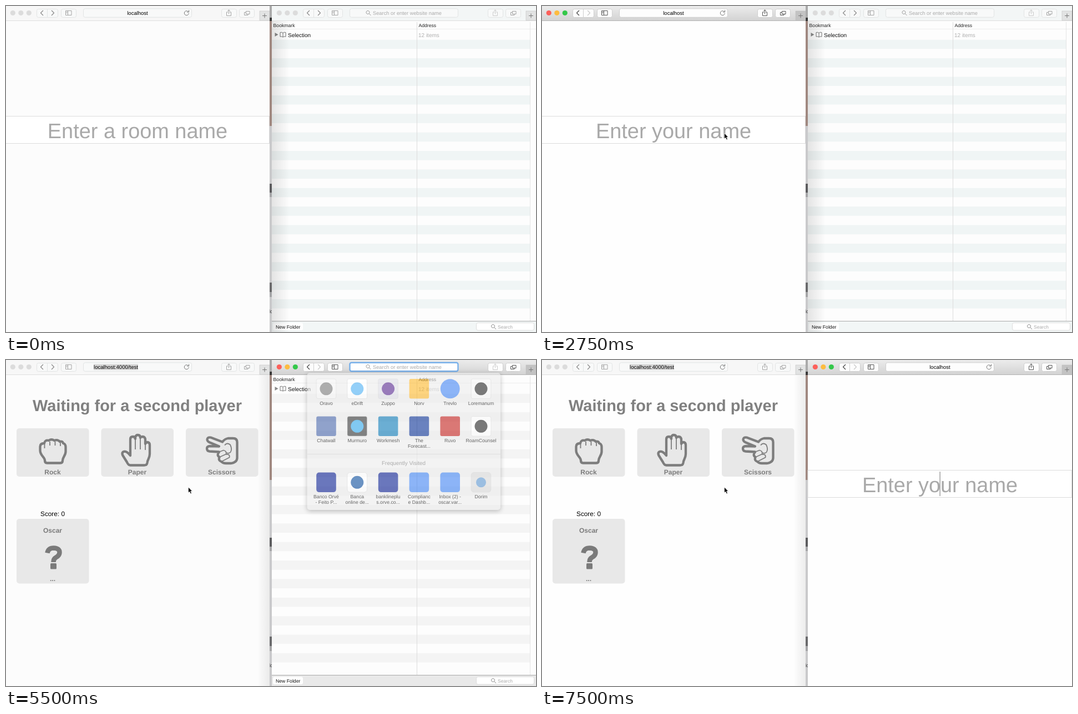
Animation of 955x587 px, one loop 8000 ms. Source, as an HTML page:

```html
<!DOCTYPE html>
<html>
<head>
<meta charset="utf-8">
<style>
html, body { margin: 0; width: 100%; height: 100%; overflow: hidden; background: #fff }
svg { display: block; font-family: "Liberation Sans", Arial, sans-serif; text-rendering: geometricPrecision; white-space: pre }
.pop { filter: drop-shadow(0 2px 4px rgba(0, 0, 0, .4)) }
</style>
</head>
<body>
<svg id="stage" width="955" height="587" viewBox="0 0 955 587">
  <defs>
    <linearGradient id="bar" x2="0" y2="1"><stop stop-color="#ececec"/><stop offset="1" stop-color="#d3d3d3"/></linearGradient>
    <linearGradient id="shadeR"><stop stop-opacity=".1"/><stop offset="1" stop-opacity="0"/></linearGradient>
    <linearGradient id="shadeL"><stop stop-opacity="0"/><stop offset="1" stop-opacity=".07"/></linearGradient>
  </defs>
  <g id="scene"></g>
</svg>
<script>
const STEP = 250, LOOP = 8000;
const scene = document.getElementById('scene');

const rect = (x, y, w, h, fill, more = '') => `<rect x="${x}" y="${y}" width="${w}" height="${h}" fill="${fill}" ${more}/>`;
const circle = (x, y, r, fill) => `<circle cx="${x}" cy="${y}" r="${r}" fill="${fill}"/>`;
const line = (d, stroke, width = 1, more = '') => `<path d="${d}" fill="none" stroke="${stroke}" stroke-width="${width}" stroke-linejoin="round" ${more}/>`;
const text = (x, y, s, size, fill = '#000', more = '') => `<text x="${x}" y="${y}" font-size="${size}" fill="${fill}" ${more}>${s}</text>`;
const mid = 'text-anchor="middle"', bold = mid + ' font-weight="bold"';
const glass = (x, y, c) => line(`M${x + 3} ${y}a3 3 0 1 0 .01 0M${x + 5.2} ${y + 5.2}l3.3 3.3`, c);

// Toolbar of one window. url: {value, at, select, focus}; no value shows the prompt.
function toolbar(active, url, shareOff, idle) {
  const ink = active ? '#555' : '#a4a4a4', edge = active ? '#cfcfcf' : '#e2e4e4';
  const face = active ? '#fdfdfd' : '#f8f9f9';
  const button = (x, w) => rect(x + .5, 5.5, w, 15, face, `rx="3" stroke="${edge}"`);
  const lights = active ? ['#fc605b', '#fdbc40', '#34c84a'] : Array(3).fill('#dcdcdc');
  let s = rect(-1, 0, 476, 26, active ? 'url(#bar)' : idle) + rect(-1, 26, 476, 1, active ? '#b4b4b4' : '#dedede');
  lights.forEach((c, i) => s += circle(12.3 + 14.5 * i, 12.5, 4.6, c));
  s += button(55, 38) + rect(74, 6, 1, 14, edge);
  s += line('M67 8l-4.5 4.5 4.5 4.5', active ? '#444' : '#888', 1.2) + line('M82 8l4.5 4.5-4.5 4.5', active ? '#c8c8c8' : '#888', 1.2);
  s += button(99, 27) + line('M107.5 8.5h10.5v8h-10.5zM111.5 8.5v8M108.5 10.5h2M108.5 12.5h2', ink);
  s += rect(139.5, 4.8, 195, 15.5, url.focus ? '#fff' : face, `rx="3" stroke="${url.focus ? '#78b0ea' : edge}" stroke-width="${url.focus ? 2.4 : 1}"`);
  if (url.select) s += rect(158, 7.5, 80, 10.5, url.select);
  if (!url.value) s += glass(169, 8.5, '#999') + text(181, 16, 'Search or enter website name', 9.3, '#aaa');
  else s += url.at ? text(url.at, 16, url.value, 9.6) : text(237, 16, url.value, 9.5, '#000', mid);
  if (url.value && !url.caret) s += line('M328.6 10.5a4 4 0 1 0 .7 2.6M329.5 7.5v3.5h-3.5', '#777');
  if (url.caret) s += rect(263.5, 7, 1, 11.5, '#000');
  s += button(388, 27) + line('M400 11h-2.500v6.500h8v-6.500h-2.500M401.500 14.500v-7.500M399 9.300l2.500-2.500 2.500 2.500', shareOff ? '#ccc' : ink);
  s += button(420, 27) + line('M432.500 9.500h6.500v5h-6.500zM432 11.500h-2.500v5h6.500v-2', ink);
  return s + rect(457, 9, 18, 17, active ? '#c3c3c3' : '#e2e3e3', 'stroke="#bbb" stroke-width=".5"') + line('M462 17.500h8M466 13.500v8', '#777');
}

function prompt(label, typed, caret) {
  const x = 237 + typed.length * 9.2;
  return rect(-1, 198.5, 475.5, 49, '#fff', 'stroke="#dcdcdc"')
    + text(237, 237.5, typed || label, 37.9, typed ? '#333' : '#a9a9a9', mid)
    + (caret ? rect(x - .5, 201, 1.2, 44, '#888') : '');
}

const hands = [
  ['Rock', 84, 'M74 185.500Q70 185.500 70 181C70 175 61.500 172 61.500 163V156Q61.500 150 69 150Q70 143.500 77 145Q82 141.500 87 145Q93 142.500 97 147Q102 145.500 103 150Q107.500 151 107.500 157V165C107.500 172 102 175 102 181Q102 185.500 98 185.500Z',
    'M69.500 150v9M79 147v7M88.500 147v7M98 149v6'],
  ['Paper', 236.5, 'M224 189.500Q220 189 218 184L210.500 172Q208 167 212 165Q217 163 224 172V143Q224 138 228.500 138Q232 138 233 142V139Q234 135 237.500 135Q242 135 242 140Q243 138 246.500 138Q251 138.500 251 144V151Q252 148 255 148Q259 148.500 259 153V169C259 177 255 179 254.500 185Q254 189.500 249 189.500Z',
    'M233 141v20M242 140v21M251 149v13'],
  ['Scissors', 389, 'M390 147.500L369 139.500Q363 138.500 362.500 143Q362.500 146 366 148L384 155.500L367 155Q362 155.500 362 159.500Q362 164 367 164.500L384 165.500Q379 171 384.500 175Q382 181 388 183Q391 186 396 186H406Q416.500 184 416.500 176V148Q416.500 141 409 141H400Q394 142 390 147.500Z',
    'M384 165.500L392 162.500Q398 164 396.500 169.500L384.500 175M396.500 170Q404 169 402.500 175.500L388 183M394 153.500Q398 148 404 152.500Q408 161 404.500 166Q402 169 397 167']
];

function game(fading) {
  let cards = '';
  hands.forEach(([name, x, outline, inner]) => {
    cards += rect(x - 65, 123, 130.5, 87, '#e8e8e8', 'rx="5"') + line(outline, '#7d7d7d', 4.3)
      + line(inner, '#7d7d7d', 1.8) + text(x, 205.7, name, 12, '#7d7d7d', bold);
  });
  cards += rect(19, 286, 130.5, 116.5, '#e8e8e8', 'rx="5"') + text(84, 310.5, 'Oscar', 12, '#7a7a7a', bold)
    + line('M74.500 347.500Q76 338.500 86 338.500Q97 339 96.500 347Q96 352.500 90 355.500Q85.500 358 85.500 364', '#7a7a7a', 8.5)
    + rect(80, 366, 11, 10.5, '#7a7a7a', 'rx="1.5"') + text(84, 398, '...', 12, '#7a7a7a', bold);
  return (fading ? rect(0, 70, 475, 332, '#fafafa') : '')
    + text(236.5, 91.8, 'Waiting for a second player', 28.95, '#808080', bold)
    + `<g opacity="${fading ? .55 : 1}">${cards}</g>` + text(84, 281, 'Score: 0', 11.8, '#000', mid);
}

const autofill = () => `<g class="pop">${rect(-6, 248.5, 182, 32, '#ececec', 'rx="4"')}</g>`
  + rect(10, 256, 21, 16, '#fafafa', 'rx="1.5" stroke="#bbb" stroke-width=".7"')
  + circle(16.5, 261, 1.9, '#444') + rect(13, 263.5, 7, 3.5, '#444', 'rx="1"') + line('M22.500 261.500h6M22.500 264h6', '#ccc')
  + text(37.5, 262, 'AutoFill your contact info', 10.2, '#666') + text(37.5, 273.8, 'Oscar Milton Varelo', 10.1);

// Each site: label lines, tile colour, optional dot colour.
const sites = [
  ['Oravo', '#f4f4f4', '#777'], ['eDrift', '#fff', '#4db1f6'], ['Zuppo', '#dedee6', '#56258f'],
  ['Norv', '#fdb92d'], ['Trevlo', 'none', '#4285f4'], ['Loremanum', '#f6f6f6', '#222'],
  ['Chatwall', '#4866ab'], ['Murmuro', '#343536', '#2fa8ec'], ['Workmesh', '#0b7ab8'],
  ['The|Forecast...', '#0a3296'], ['Ruvo', '#c4201c'], ['RoamCounsel', '#fff', '#222'],
  ['Banco Orv\u00e9|- Feito P...', '#0a1f92'], ['Banca|online de...', '#fff', '#0b4d9e'], ['banklineplu|s.orve.co...', '#0a1f92'],
  ['Complianc|e Dashb...', '#4285f4'], ['Inbox (2) -|oscar.var...', '#4285f4'], ['Dorim', '#dadada', '#5b95cf']
];

function panel(opacity) {
  let s = `<g class="pop">${rect(62.5, 23, 348.5, 247, '#ededed', 'rx="5"')}</g>` + rect(63, 169, 348, 1, '#d2d2d2')
    + text(236.5, 188.8, 'Frequently Visited', 9.9, '#777', mid);
  sites.forEach(([label, tile, dot], i) => {
    const x = 97 + 55.8 * (i % 6), row = i / 6 | 0, y = [34, 101.5, 202.5][row];
    s += rect(x - 17.8, y, 35.6, 35.6, tile, `rx="${row > 1 ? 5 : 3}"` + (dot && tile != 'none' ? ' stroke="#ccc" stroke-width=".6"' : ''));
    if (dot) s += circle(x, y + 17.8, tile == 'none' ? 17.5 : i == 17 ? 9 : 11.5, dot);
    label.split('|').forEach((part, n) => s += text(x, y + 46.7 + 10.2 * n, part, 8.7, '#000', mid));
  });
  return `<g opacity="${opacity}">${s}</g>`;
}

function bookmarks(active) {
  const tint = active ? '#f4f4f4' : '#f0f5f5';
  let s = rect(-1, 27, 476, 560, '#fdfdfd');
  for (let i = 0; i < 15; i++) s += rect(-1, 60.7 + 33.38 * i, 465, 16.6, tint);
  s += rect(-1, 41, 476, 1, '#ececec') + rect(260, 29, 1, 538, '#dcdcdc') + rect(464, 29, 1, 538, '#e4e4e4');
  s += text(1.5, 38, 'Bookmark', 8.7, '#222') + text(263.5, 38, 'Address', 8.6, '#222');
  s += '<path d="M4.500 48l6 3.500-6 3.500z" fill="#888"/>'
    + line('M19 48.500q-2.500-2-5-.8v7.500q2.500-1 5 .8q2.500-1.800 5-.8v-7.500q-2.500-1.200-5 .8v7.500', '#777')
    + text(28, 55.8, 'Selection', 10, '#111') + text(263, 55.8, '12 items', 10, '#b0b0b0');
  s += rect(-1, 567, 476, 20, active ? '#e9e9e9' : '#f2f6f6') + rect(-1, 567, 476, 1, '#aaa');
  return s + rect(1, 570.5, 54, 13.5, '#fff', 'rx="3"') + text(6, 580.8, 'New Folder', 8.7, '#111')
    + rect(367.5, 570.5, 104, 13.5, '#fff', 'rx="3" stroke="#ddd"') + glass(394.5, 573.5, '#888') + text(406, 580.8, 'Search', 8.5, '#aaa');
}

function desktop() {
  return rect(474, 0, 6, 587, '#c9c9cb') + rect(474, 0, 6, 21, '#aaa') + rect(474, 21, 6, 6, '#333') + rect(474, 27, 6, 189, '#a08880')
    + rect(474, 320, 6, 16, '#5c5c5e') + rect(474, 336, 6, 8, '#a5a5a7')
    + rect(474, 498, 6, 17, '#6a6a6c') + rect(474, 515, 6, 9, '#a5a5a7') + text(474, 553, 'lo', 9, '#333');
}

function leftWindow(step) {
  const active = step >= 3 && step < 21, late = step >= 17;
  const typed = step >= 13 ? 'Oscar' : step == 12 ? 'Osc' : step == 7 || step == 8 ? 'test' : step == 6 ? 'te' : '';
  const caret = [3, 4, 6, 7, 9, 10, 12].includes(step);
  const url = late
    ? { value: 'localhost:4000/test', at: 158, select: active ? '#b0d3fc' : '#d6d6d6', focus: active }
    : { value: 'localhost' };
  let s = rect(0, 27, 475, 560, active || step >= 26 ? '#fefefe' : '#fcfcfc');
  s += step < 15 ? prompt(step < 9 ? 'Enter a room name' : 'Enter your name', typed, caret) : game(step == 15);
  if (!active && step > 20) s += rect(453, 27, 22, 560, 'url(#shadeL)');
  s += toolbar(active, url, false, '#f7f7f7');
  if (step == 15) s += autofill();
  if (step >= 18 && step < 21) s += panel(step == 18 ? .6 : 1);
  return s;
}

function rightWindow(step) {
  const active = step >= 21, open = step >= 22 && step < 26, loaded = step >= 26;
  const url = loaded ? { value: 'localhost' }
    : step >= 24 ? { value: 'http://localhost:4000/test', at: 158, focus: true, caret: step == 24 }
    : { focus: active };
  let s = loaded ? rect(-1, 27, 476, 560, '#fefefe') : bookmarks(active);
  if (step >= 27) s += prompt('Enter your name', '', step >= 30 || step == 28);
  if (!active) s += rect(-1, 27, 32, 560, 'url(#shadeR)');
  s += toolbar(active, url, !loaded, '#f3f6f6');
  if (open) s += panel(step == 22 || step == 25 ? .6 : 1);
  return s;
}

function pointer(step) {
  if (!step) return '';
  const [x, y] = [[498, 262], [395, 240], [288, 231], [312, 230]][step - 1] || [328.5, 229];
  return `<path transform="translate(${x} ${y})" d="M0 0v10l2.300-2 1.700 3.800 1.900-.8-1.700-3.700h3z" fill="#000" stroke="#fff" stroke-width=".7"/>`;
}

let shown = -1;
function tick(now) {
  const step = Math.floor(now % LOOP / STEP);
  if (step != shown) {
    shown = step;
    scene.innerHTML = desktop() + `<g transform="translate(480 0)">${rightWindow(step)}</g>` + leftWindow(step) + pointer(step);
  }
  requestAnimationFrame(tick);
}
tick(0);
</script>
</body>
</html>
```
